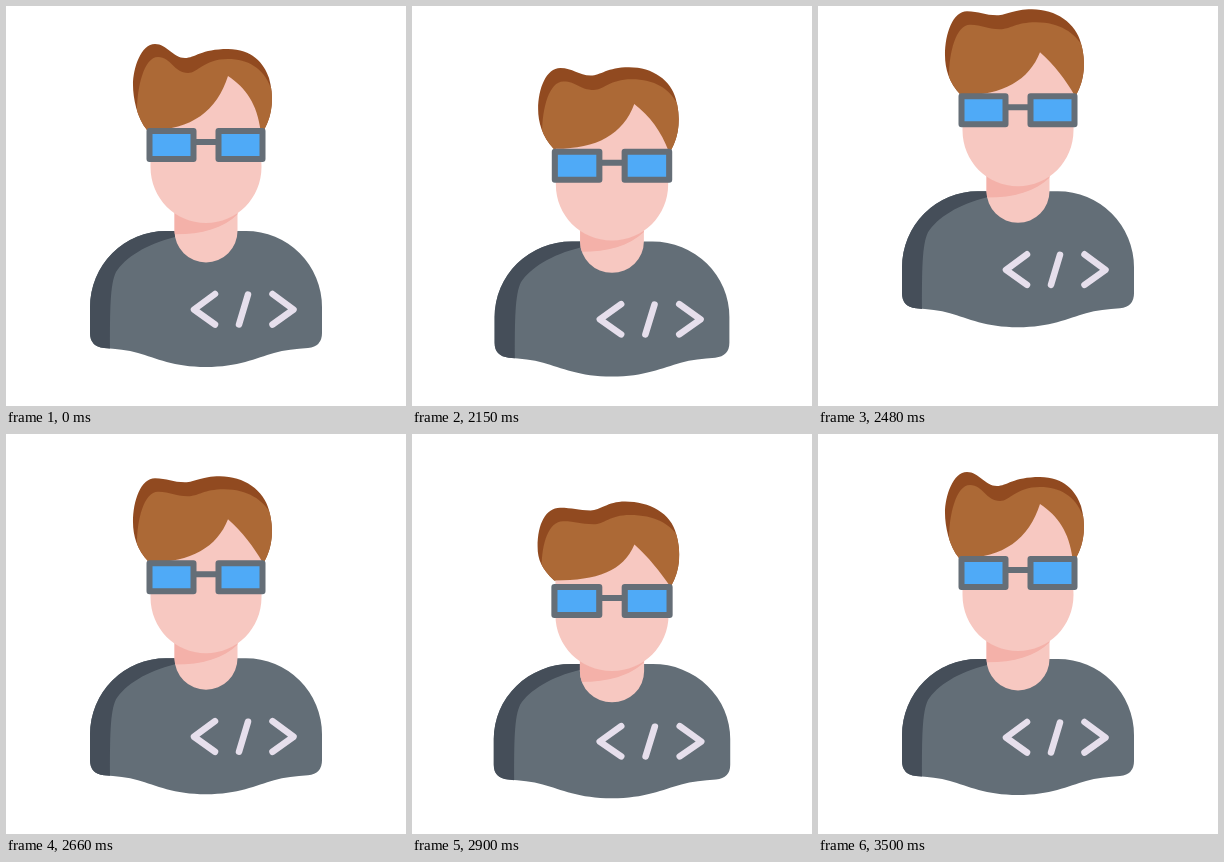
Animation of 400x400 px, one loop 3.53 s. Source, as an HTML page:

```html
<!DOCTYPE html>
<html lang="en">
<head>
<meta charset="utf-8">
<title>Bouncing developer</title>
<style>
  html, body { margin: 0; width: 100%; height: 100%; overflow: hidden; background: #fff; }
  svg { display: block; width: 100%; height: 100%; }
  .cloth { fill: #636e77; }
  .skin { fill: #f7c8c1; }
  .code, .frames { fill: none; stroke-linecap: round; stroke-linejoin: round; }
  .code { stroke: #e6dfec; stroke-width: 6.5; }
  .frames { fill: #4faaf7; stroke: #656e77; stroke-width: 6; }
</style>
</head>
<body>
<svg viewBox="0 0 400 400">
  <defs>
    <clipPath id="neckClip"><path class="neck"/></clipPath>
    <clipPath id="hairClip"><path class="hair"/></clipPath>
  </defs>
  <g id="body">
    <path class="cloth" d="M84 301A76 76 0 0 1 160 225H240A76 76 0 0 1 316 301V327Q316 340.5 302 342C290 343 278 344 268 347C250 352 232 361 200 361C168 361 150 352 132 347C122 344 110 343 98 342Q84 340.5 84 327Z"/>
    <path fill="#454e59" d="M160 225H169V231C140 238 119 252 110 266C104 278 104 305 104 342.6L98 342Q84 340.5 84 327V301A76 76 0 0 1 160 225Z"/>
    <path class="code" d="M209 288L188 303.5L209 318.5M242 288.5L233 318.5M266.5 288L287.5 303.5L266.5 318.5"/>
    <path class="neck skin"/>
    <g clip-path="url(#neckClip)">
      <path id="shade" fill="#f4b1a9" d="M160 170H240V198C225 222 195 230 160 228Z"/>
    </g>
  </g>
  <g id="head">
    <g class="upper">
      <path class="hair" fill="#914a20"/>
      <path class="light" fill="#ac6936" clip-path="url(#hairClip)"/>
    </g>
    <path class="face skin"/>
    <g class="upper frames">
      <path d="M190 136H210"/>
      <rect x="143.5" y="125" width="44" height="28"/>
      <rect x="212.5" y="125" width="44" height="28"/>
    </g>
  </g>
</svg>
<script>
const LOOP = 3530, STEP = 30, PHASE = 20;
const set = (query, name, value) =>
  document.querySelectorAll(query).forEach(el => el.setAttribute(name, value));

const progress = (t, a, b) => Math.min(1, Math.max(0, (t - a) / (b - a)));
const ease = (t, a, b) => (1 - Math.cos(Math.PI * progress(t, a, b))) / 2;
const easeOut = (t, a, b) => Math.sin(Math.PI / 2 * progress(t, a, b));
const bump = (t, a, peak, b) => ease(t, a, peak) - ease(t, peak, b);

function pose(t) {
  const crouch = bump(t, 2000, 2150, 2290);
  const jump = bump(t, 2186, 2466, 2746);
  const land = bump(t, 2660, 2790, 3030);
  const whip = bump(t, 2660, 2860, 3085);   // the head follows the landing late
  const rebound = bump(t, 2980, 3085, 3250);
  const settle = bump(t, 3150, 3280, 3500);
  const nod = ease(t, 2000, 2250) - ease(t, 2900, 3085);
  return {
    y: 10 * (easeOut(t, 2000, 2186) - ease(t, 2746, 3000)) - 50 * jump - 2.4 * rebound + 1.5 * settle,
    wide: .012 * crouch + .034 * land,
    drop: 3 * nod + 5 * crouch + 13 * whip - .5 * rebound,
    slide: 2 * nod + 2 * crouch + 6.5 * whip + rebound,
    nod: nod + .15 * whip,
    puff: 2 * crouch + 6 * whip - 3 * rebound,
    neck: 8 * whip
  };
}

// The hair is three levels (tuft, dip, crown) that shift as the head nods.
function hairPath(n, k, hem) {
  const tuft = 38 + 2 * n + k, dip = 52 - 8 * n + k, crown = 43 - 5 * n + .4 * k;
  return `M${141 + 2 * n} ${hem}C131 ${hem - 12} 127 ${92 + 5 * n} 127 ${79 + 5 * n}
    C127 62 135 ${tuft} 149 ${tuft}C161 ${tuft} 167 ${dip} 179 ${dip}
    C189 ${dip} 195 ${crown} ${222 - 8 * n} ${crown}
    C${246 - 8 * n} ${crown} 258 ${57 - 5 * n} 263 72C268 90 267 108 258 124Z`;
}

function lightPath(n, k) {
  const tuft = 51 + 2.5 * n + k, dip = 67 - 9 * n + k, crown = 53 - 2 * n + .4 * k;
  return `M131 106C131 81 138 ${tuft} 152 ${tuft}C165 ${tuft} 168 ${dip} 182 ${dip}
    C192 ${dip} 198 ${crown} ${222 - 4 * n} ${crown}
    C242 ${crown} 257 62 264.5 ${81 - 6 * n}H280V135H120Z`;
}

function facePath(n, hem, slide) {
  const tip = 70 + 11 * n + slide;
  return `M144.5 ${hem}C185 ${hem} 211 ${tip + 35 - 7 * n} 222 ${tip}
    C${240 - 4 * n} ${tip + 12} ${251 - 3 * n} ${tip + 28} ${254.5 + 2 * n} ${124 + slide}
    L255.5 161C255.5 192 231 217 200 217C169 217 144.5 192 144.5 161Z`;
}

// Scale about a point on the centre line, then shift down.
const place = (dy, pivot, sx, sy) =>
  `translate(200 ${pivot + dy}) scale(${sx} ${sy}) translate(-200 ${-pivot})`;

function draw(t) {
  const { y, wide, drop, slide, nod, puff, neck } = pose(t);
  const tall = 1 - .6 * wide, hem = 124 - puff;

  set('#body', 'transform', place(y, 361, 1 + wide, tall));
  set('.neck', 'd', `M168.5 185V${225 + neck}a31.5 31.5 0 0 0 63 0V185Z`);
  set('#shade', 'transform', `translate(0 ${drop})`);

  set('#head', 'transform', place(y + 136 * (1 - tall) + drop, 217, 1 + wide, 1));
  set('.upper', 'transform', `translate(0 ${slide})`);
  set('.hair', 'd', hairPath(nod, puff, hem));
  set('.light', 'd', lightPath(nod, puff));
  set('.face', 'd', facePath(nod, hem + slide, slide));
}

function tick() {
  const t = performance.now() % LOOP;
  draw(Math.floor((t - PHASE) / STEP) * STEP + PHASE);
  requestAnimationFrame(tick);
}
tick();
</script>
</body>
</html>
```
